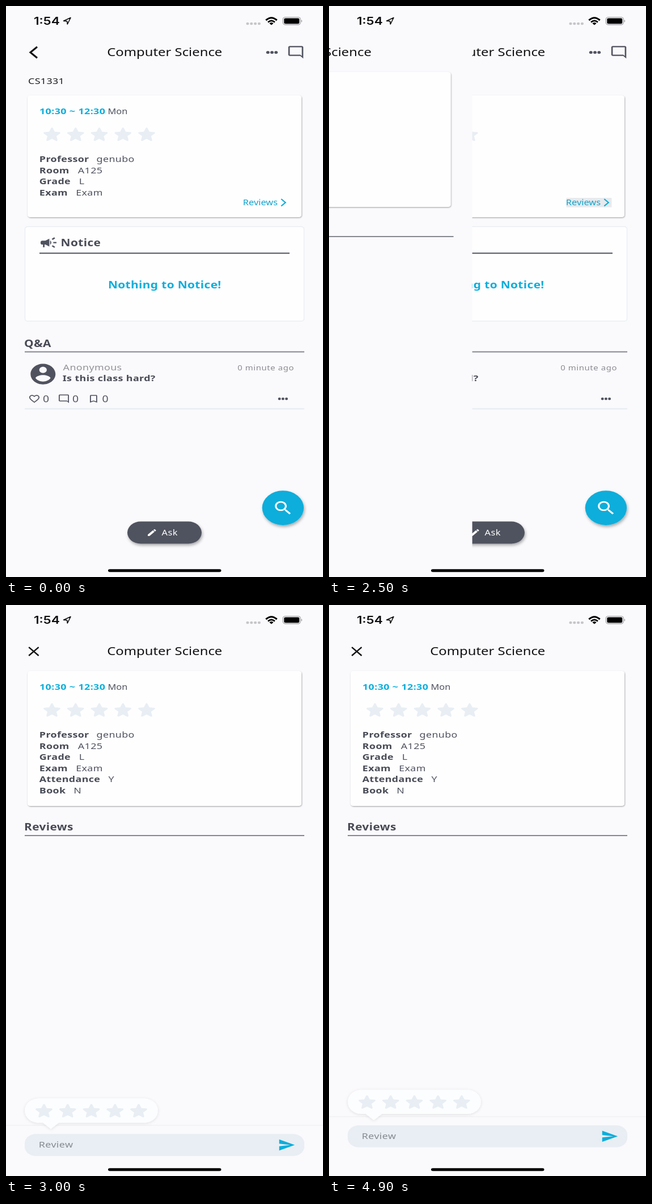
An HTML page for the animation above (5000 ms loop, 559 by 1003 pixels).

```html
<!DOCTYPE html>
<html lang="en">
<head>
<meta charset="utf-8">
<title>Class reviews</title>
<style>
html, body { margin: 0; width: 100%; height: 100%; overflow: hidden; background: #faf9fc; }
svg { display: block; width: 100%; height: 100%; }
text { font-family: "Noto Sans", sans-serif; }
.clock { font-family: Inter, "Liberation Sans", sans-serif; }
</style>
</head>
<body>
<svg id="stage" viewBox="0 0 559 1003" preserveAspectRatio="none"></svg>
<script>
const W = 559, H = 1003, LOOP = 5000;
// The 375 x 812 screen is shown slightly wide.
const SX = W / 375, SY = H / 812;
const BG = "#faf9fc", CARD = "#fefeff", DARK = "#50535f", INK = "#484b55";
const CYAN = "#0caedb", PALE = "#e8eef4", GREY = "#85888f";

const ICONS = {
  chat: "M20 2H4c-1.1 0-2 .9-2 2v18l4-4h14c1.1 0 2-.9 2-2V4c0-1.1-.9-2-2-2zm0 14H6l-2 2V4h16v12z",
  heart: "M16.5 3c-1.74 0-3.41.81-4.5 2.09C10.91 3.81 9.24 3 7.5 3 4.42 3 2 5.42 2 8.5c0 3.78 3.4 6.86 8.55 11.54L12 21.35l1.45-1.32C18.6 15.36 22 12.28 22 8.5 22 5.42 19.58 3 16.5 3zm-4.4 15.55l-.1.1-.1-.1C7.14 14.24 4 11.39 4 8.5 4 6.5 5.5 5 7.5 5c1.54 0 3.04.99 3.57 2.36h1.87C13.46 5.99 14.96 5 16.5 5c2 0 3.5 1.5 3.5 3.5 0 2.89-3.14 5.74-7.9 10.05z",
  mark: "M17 3H7c-1.1 0-2 .9-2 2v16l7-3 7 3V5c0-1.1-.9-2-2-2zm0 15l-5-2.18L7 18V5h10v13z",
  user: "M12 2C6.48 2 2 6.48 2 12s4.48 10 10 10 10-4.48 10-10S17.52 2 12 2zm0 3c1.66 0 3 1.34 3 3s-1.34 3-3 3-3-1.34-3-3 1.34-3 3-3zm0 14.2c-2.5 0-4.71-1.28-6-3.22.03-1.99 4-3.08 6-3.08 1.99 0 5.97 1.09 6 3.08-1.29 1.94-3.5 3.22-6 3.22z",
  horn: "M18 11v2h4v-2zM16 17.6l3.2 2.4 1.2-1.6-3.2-2.4zM20.4 5.6L19.2 4 16 6.4 17.2 8zM4 9c-1.1 0-2 .9-2 2v2c0 1.1.9 2 2 2h1v4h2v-4h1l5 3V6L8 9zm11.5 3c0-1.33-.58-2.53-1.5-3.35v6.69c.92-.81 1.5-2.01 1.5-3.34z",
  star: "M12 17.27l4.15 2.51c.76.46 1.69-.22 1.49-1.08l-1.1-4.72 3.67-3.18c.67-.58.31-1.68-.57-1.75l-4.83-.41-1.89-4.46c-.34-.81-1.5-.81-1.84 0L9.19 8.63l-4.83.41c-.88.07-1.24 1.17-.57 1.75l3.67 3.18-1.1 4.72c-.2.86.73 1.54 1.49 1.08z",
  search: "M15.5 14h-.79l-.28-.27C15.41 12.59 16 11.11 16 9.5 16 5.91 13.09 3 9.5 3S3 5.91 3 9.5 5.91 16 9.5 16c1.61 0 3.09-.59 4.23-1.57l.27.28v.79l5 4.99L20.49 19zm-6 0C7.01 14 5 11.99 5 9.5S7.01 5 9.5 5 14 7.01 14 9.5 11.99 14 9.5 14z",
  pen: "M3 17.25V21h3.75L17.81 9.94l-3.75-3.75zM20.71 7.04c.39-.39.39-1.02 0-1.41l-2.34-2.34c-.39-.39-1.02-.39-1.41 0l-1.83 1.83 3.75 3.75z",
  send: "M2 21L23 12 2 3v7l15 2-15 2z"
};

function text(x, y, str, size, fill, { bold, gap = 0.25, mid, cls = "" } = {}) {
  return `<text transform="translate(${x} ${y}) scale(${SX} ${SY})" font-size="${size}" fill="${fill}"` +
    ` font-weight="${bold || 400}" letter-spacing="${gap}" text-anchor="${mid ? "middle" : "start"}" class="${cls}">${str}</text>`;
}

function icon(name, x, y, size, fill, flip = 1) {
  const k = size / 24;
  return `<path transform="translate(${x} ${y}) scale(${SX * k * flip} ${SY * k}) translate(-12 -12)" d="${ICONS[name]}" fill="${fill}"/>`;
}

function box(x, y, w, h, r, fill, more = "") {
  return `<rect x="${x}" y="${y}" width="${w}" height="${h}" rx="${r * SX}" ry="${r * SY}" fill="${fill}" ${more}/>`;
}

const line = (d, color, width) => `<path d="${d}" fill="none" stroke="${color}" stroke-width="${width}"/>`;

const dots = (x, y, step, n, rx, ry, fill) => Array.from({ length: n }, (_, i) =>
  `<ellipse cx="${x + i * step}" cy="${y}" rx="${rx}" ry="${ry}" fill="${fill}"/>`).join("");

const stars = (x, y) => [0, 1, 2, 3, 4].map(i => icon("star", x + i * 28 * SX, y, 28, PALE)).join("");

const title = () => text(279.8, 88.4, "Computer Science", 16, "#111113", { gap: 0, mid: true });

const shadow = (id, dx, dy, blur, alpha) =>
  `<filter id="${id}" x="-20%" y="-20%" width="140%" height="150%"><feDropShadow dx="${dx}" dy="${dy}" stdDeviation="${blur}" flood-opacity="${alpha}"/></filter>`;

// Class details: label, value, x of value
const ROWS = [
  ["Professor", "genubo", 159.6], ["Room", "A125", 126.8], ["Grade", "L", 128.8],
  ["Exam", "Exam", 123.2], ["Attendance", "Y", 180.4], ["Book", "N", 119.2]
];

function classCard(top, height, count) {
  const rows = ROWS.slice(0, count).map(([label, value, x], i) => {
    const y = top + 117 + i * 19.5;
    return text(58.8, y, label, 12, INK, { bold: 700 }) + text(x, y, value, 12, DARK);
  });
  return box(38, top, 483, height, 3.5, CARD, 'filter="url(#lift)"') +
    text(59, top + 33.3, "10:30 ~ 12:30", 12, CYAN, { bold: 700 }) +
    text(179.4, top + 33.2, "Mon", 11, DARK, { gap: 0 }) +
    stars(81, top + 68.7) + rows.join("");
}

function statusBar() {
  return text(49, 33, "1:54", 15.2, "#0b0b0c", { bold: 600, gap: 0, cls: "clock" }) +
    `<path d="M101.5 26.2L114 20.5 108.3 32 107.6 26.6z" fill="none" stroke="#0b0b0c" stroke-width="1.6" stroke-linejoin="round"/>` +
    dots(426, 31, 6.8, 4, 2.6, 2.2, "#c6c5c9") +
    line("M458.3 25Q468 16.5 477.7 25", "#000", 3.1) +
    line("M462 28.5Q468 23.2 474 28.5", "#000", 2.8) +
    `<path d="M464.4 30.4Q468 27.6 471.6 30.4L468 33.6z"/>` +
    box(488.3, 19.7, 31, 13.2, 2.9, "none", 'stroke="#98979b" stroke-width="1.1"') +
    box(490.3, 21.4, 27, 9.8, 1.8, "#000") +
    `<path d="M520.8 24Q523.4 26.3 520.8 28.7z" fill="#8b8a8f"/>` +
    box(180, 989.2, 199.5, 5, 2, "#000");
}

function classPage() {
  return line("M55 71.8L43 81.5 55 91.2", "#111113", 3.1) + title() +
    dots(461.8, 81.5, 7.2, 3, 3, 2.5, DARK) + icon("chat", 511, 81.2, 21.3, DARK, -1) +
    text(39, 137.3, "CS1331", 12, "#1c1c1f") +
    classCard(157, 214, 4) +
    `<rect id="press" x="418.5" y="337" width="80" height="16.5" fill="#e8eaed"/>` +
    text(417.8, 350, "Reviews", 11, "#14a3cb", { gap: 0 }) +
    line("M485.3 339L492.8 345.2 485.3 351.4", CYAN, 2.1) +

    box(33.5, 387.5, 492, 166, 3.5, CARD, 'stroke="#e8edf2" stroke-width="1.3"') +
    icon("horn", 75, 415.6, 22.5, DARK) +
    text(96.6, 421.7, "Notice", 14, INK, { bold: 700 }) +
    line("M59 434.3H500", DARK, 2) +
    text(279.8, 496.2, "Nothing to Notice!", 14, CYAN, { bold: 700, mid: true }) +

    text(32, 598.8, "Q&amp;A", 14, INK, { bold: 700 }) +
    line("M33 607.6H526", GREY, 2) +
    icon("user", 65.3, 646.6, 35.4, DARK) +
    text(100.6, 640.2, "Anonymous", 12, "#929398") +
    text(99.8, 659.2, "Is this class hard?", 12, INK, { bold: 700 }) +
    text(408.2, 639.8, "0 minute ago", 10, "#8b8d93", { gap: 0.4 }) +
    icon("heart", 50, 690, 14.5, DARK) + icon("chat", 102, 690, 14.5, DARK, -1) + icon("mark", 154.4, 690, 14.7, DARK) +
    [65, 117, 169.5].map(x => text(x, 695.8, "0", 13, DARK, { gap: 0 })).join("") +
    dots(482.2, 690, 6.2, 3, 2.5, 2.2, DARK) +
    line("M33 707.4H526", "#e6ecf1", 2) +

    `<ellipse cx="488.4" cy="881.6" rx="36.7" ry="30.3" fill="${CYAN}" filter="url(#float)"/>` +
    icon("search", 488.6, 881.8, 25.8, "#fff") +
    box(214, 905.6, 131, 39, 15.8, DARK, 'filter="url(#float)"') +
    icon("pen", 257.3, 925, 13, "#fff") + text(274.6, 930.2, "Ask", 11, "#fff", { gap: 0.3 });
}

function reviewPage() {
  return `<rect width="${W}" height="${H}" fill="${BG}"/>` +
    line("M40.2 74.2L57.6 89M57.6 74.2L40.2 89", "#111113", 2.4) + title() +
    classCard(116, 237, 6) +
    text(32, 396.4, "Reviews", 14, INK, { bold: 700 }) +
    line("M33 405H526", GREY, 2);
}

function reviewSheet() {
  return `<rect y="898" width="${W}" height="110" fill="${BG}"/>` +
    line(`M0 898.6H${W}`, "#f2f2f5", 1.6) +
    `<path d="M57 851.5H244A24 21.3 0 0 1 244 894.1H93L79 905 65 894.1H57A24 21.3 0 0 1 57 851.5z" fill="#fcfdfe" filter="url(#soft)"/>` +
    stars(67, 873.3) +
    box(33, 914, 493, 38.4, 13, "#e8eef3") +
    text(57.8, 937.6, "Review", 12, "#878a92") + icon("send", 494.8, 933.2, 21, CYAN);
}

const stage = document.getElementById("stage");
stage.innerHTML = "<defs>" + shadow("lift", 0.7, 1.1, 0.9, 0.36) + shadow("float", 1.5, 3, 2.4, 0.32) +
  shadow("soft", 0, 1, 2.6, 0.11) + "</defs>" +
  `<rect width="${W}" height="${H}" fill="${BG}"/>` +
  `<g id="class">${classPage()}</g>` +
  `<g id="review">${reviewPage()}<g id="sheet">${reviewSheet()}</g></g>` +
  `<g>${statusBar()}</g>`;

const [press, review, sheet] = ["press", "review", "sheet"].map(id => document.getElementById(id));

function bezier(x1, y1, x2, y2) {
  const at = (a, b, s) => 3 * a * s * (1 - s) ** 2 + 3 * b * s * s * (1 - s) + s ** 3;
  return x => {
    if (x <= 0 || x >= 1) return x <= 0 ? 0 : 1;
    let lo = 0, hi = 1;
    for (let i = 0; i < 30; i++) {
      const s = (lo + hi) / 2;
      if (at(x1, x2, s) < x) lo = s; else hi = s;
    }
    return at(y1, y2, lo);
  };
}
const ease = bezier(0.25, 0.1, 0.25, 1), decelerate = bezier(0, 0, 0.2, 1);

function show(node, on) { node.setAttribute("visibility", on ? "visible" : "hidden"); }

function draw(t) {
  const slide = ease((t - 2420) / 300);
  const rise = decelerate((t - 2850) / 250);
  show(press, t >= 2400);
  review.setAttribute("transform", `translate(${(slide - 1) * W} 0)`);
  sheet.setAttribute("transform", `translate(0 ${(1 - rise) * 160})`);
}

const start = performance.now();
function tick() {
  draw((performance.now() - start) % LOOP);
  requestAnimationFrame(tick);
}
tick();
</script>
</body>
</html>
```
